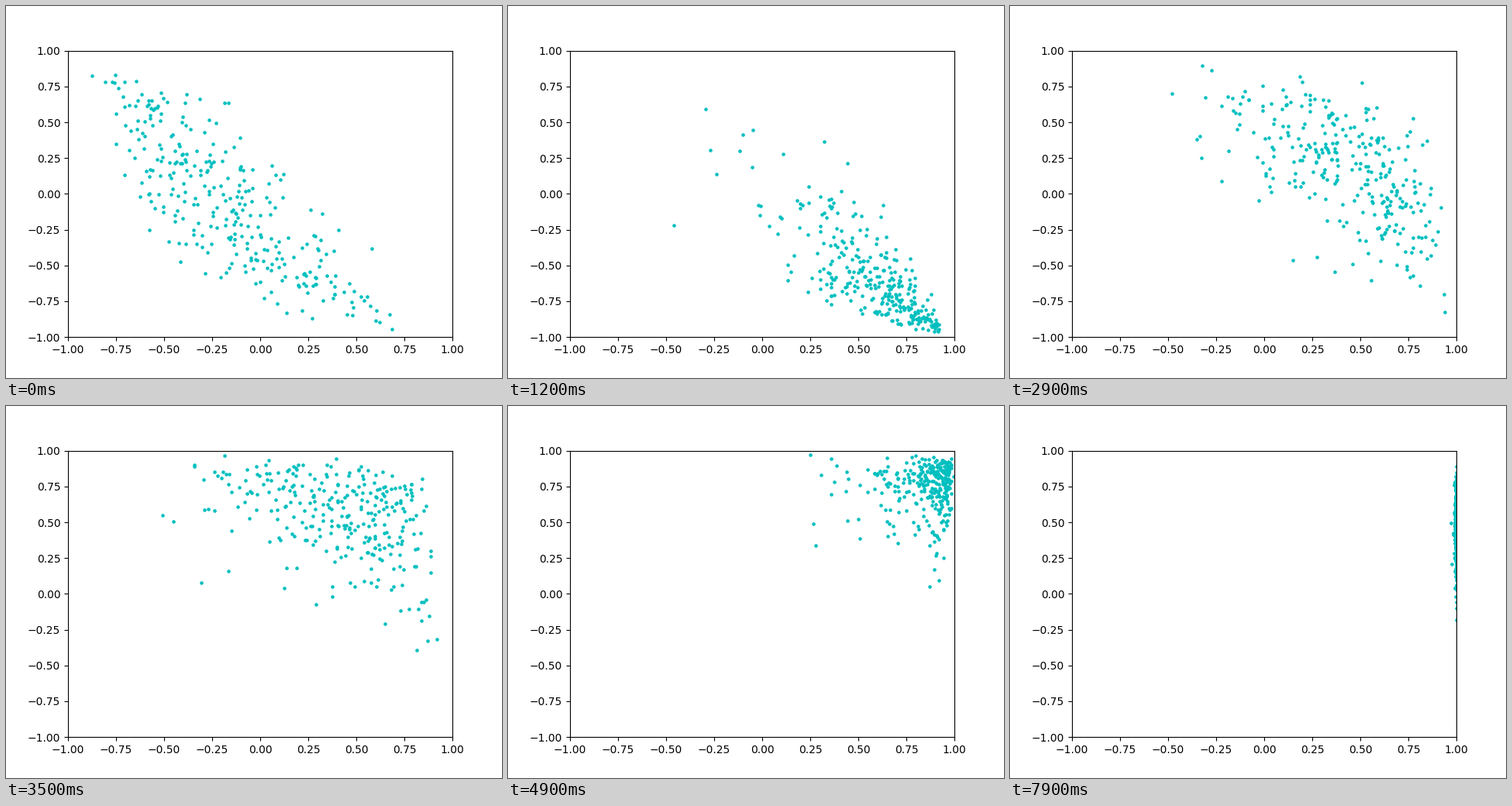
Animation of 640x480 px, one loop 8 s. Source, as a matplotlib script:

```python
import numpy as np
import matplotlib.pyplot as plt
from matplotlib.animation import FuncAnimation

FRAMES, STEP, COUNT = 80, 100, 300


def ease(s, start, end):
    """Smooth step from 0 to 1 between two times in seconds."""
    p = np.clip((s - start) / (end - start), 0, 1)
    return p * p * (3 - 2 * p)


def cloud(i):
    """Fresh batch of correlated normal samples, squashed by tanh."""
    s = i * STEP / 1000
    swing = ease(s, 0, 1.2)               # drop to the lower right corner
    rise = 0.75 * max(0, s - 3.7)         # saturation against the right edge

    mean_x = -0.2 + 0.9 * swing - 0.2 * ease(s, 1.2, 2.9) + rise
    mean_y = (-0.1 - 0.65 * swing + 1.75 * ease(s, 1.2, 4.4)
              - 0.47 * ease(s, 4.6, 7))
    sd_x = 0.4 + 0.06 * rise
    sd_y = 0.52 - 0.033 * s
    corr = -0.82 * (1 - ease(s, 2, 5))

    a, b = np.random.default_rng(100 + i).standard_normal((2, COUNT))
    x = mean_x + sd_x * a
    y = mean_y + sd_y * (corr * a + np.sqrt(1 - corr ** 2) * b)
    return np.tanh(x), np.tanh(y)


fig, ax = plt.subplots(figsize=(6.4, 4.8), dpi=100)
ax.set(xlim=(-1, 1), ylim=(-1, 1))
dots, = ax.plot([], [], "o", color="c", markersize=2.3)


def update(i):
    dots.set_data(*cloud(i))
    return dots,


anim = FuncAnimation(fig, update, frames=FRAMES, interval=STEP,
                     init_func=lambda: update(0), repeat=True, repeat_delay=0)
plt.show()
```
